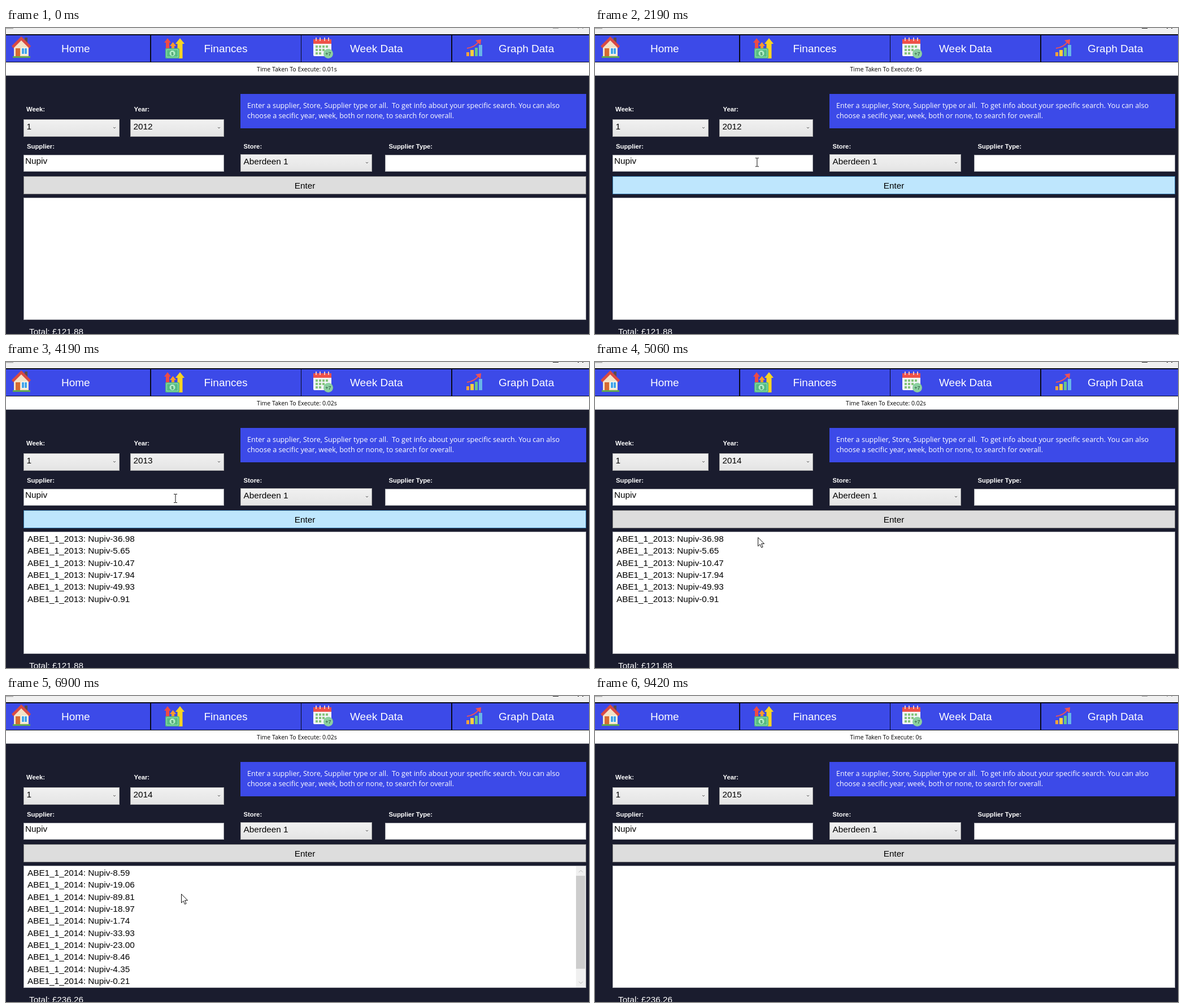
An HTML page for the animation above (9.49 s loop, 1032 by 543 pixels).

```html
<!DOCTYPE html>
<html lang="en">
<head>
<meta charset="utf-8">
<title>Finance search</title>
<style>
html, body { margin: 0; height: 100%; overflow: hidden; background: #1a1c2e; }
svg { display: block; width: 1032px; height: 543px; }
text { font: 15.3px "Liberation Sans", Arial, sans-serif; white-space: pre; }
.nav { font-size: 19px; fill: #fff; }
.label { font-size: 11.3px; font-weight: bold; fill: #fff; }
.hint { font: 12.58px "Open Sans", sans-serif; fill: #fff; }
.time { font: 10.53px "Open Sans", sans-serif; text-anchor: middle; }
.mid { text-anchor: middle; }
.white { fill: #fff; }
</style>
</head>
<body>
<svg viewBox="0 0 1032 543">
  <defs>
    <linearGradient id="grey" x2="0" y2="1"><stop stop-color="#f1f1f1"/><stop offset="1" stop-color="#e4e4e4"/></linearGradient>
    <linearGradient id="lit" x2="0" y2="1"><stop stop-color="#ecf4fc"/><stop offset="1" stop-color="#dcecfc"/></linearGradient>
  </defs>
  <g id="base"></g>
  <g id="house">
    <path fill="#5d4b4b" d="M33 17h5v12h-5z"/>
    <path fill="#f4e3c8" d="M14 33L27 21L40 33V51H14z"/>
    <path fill="#d94a43" d="M27 15L44 32L41 36L27 22L13 36L10 32z"/>
    <path fill="#d66b32" d="M17 36h8v15h-8z"/>
    <path fill="#fff" d="M27 35h11v12h-11z"/>
    <path fill="#42a5e8" d="M28 36h4v10h-4zM33 36h4v10h-4z"/>
    <path fill="#63a84f" d="M12 50h31v3H12z"/>
  </g>
  <g id="money">
    <path fill="#f9d423" d="M308 18L316 28H312.500V54H303.500V28H300z"/>
    <path fill="#f79a2e" d="M295.500 25L301 32H298V40H293V32H290z"/>
    <path fill="#ee4b45" d="M286 18L292 26H289V39H283V26H280z"/>
    <rect x="282" y="36" width="25" height="18" rx="2" fill="#56bd83"/>
    <rect x="284.500" y="38.500" width="20" height="13" fill="none" stroke="#97dfb4"/>
    <circle cx="294.500" cy="45" r="5" fill="#b3edc6"/>
    <text x="294.500" y="48" class="mid" style="font-size:8px;font-weight:bold" fill="#24834f">$</text>
  </g>
  <g id="calendar">
    <rect x="544" y="20" width="32" height="30" rx="2" fill="#f2f4f7"/>
    <path fill="#ee5149" d="M544 20h32v8h-32z"/>
    <path stroke="#f5c7c2" stroke-width="2" d="M549 17v6M556 17v6M564 17v6M571 17v6"/>
    <path stroke="#86c47b" stroke-width="4" stroke-dasharray="4 2" d="M548 33h24M548 39h18M548 45h12"/>
    <circle cx="570.500" cy="45.500" r="8.500" fill="#8bd0a0"/>
    <text x="570.500" y="49" class="mid" style="font-size:9px" fill="#25483a">+7</text>
  </g>
  <g id="chart">
    <path fill="#f9a13a" d="M815 43h5v7h-5z"/><path fill="#f7cf3f" d="M822 39h6v11h-6z"/>
    <path fill="#65c58c" d="M830 35h5v15h-5z"/><path fill="#68b5e8" d="M837 30h6v20h-6z"/>
    <path fill="none" stroke="#f05252" stroke-width="2" d="M816 36Q830 34 837 24"/>
    <path fill="#f05252" d="M831 22L841 20L840 30z"/>
  </g>
  <g id="live"></g>
</svg>
<script>
const LOOP = 9490, LAG = 60, ROW = 21.33, BRAND = "Nupiv";
const $ = id => document.getElementById(id);

const rect = (x, y, w, h, fill, line = "none") =>
  `<rect x="${x}" y="${y}" width="${w}" height="${h}" fill="${fill}" stroke="${line}"/>`;
const text = (s, x, y, cls = "") => `<text x="${x}" y="${y}" class="${cls}">${s}</text>`;
const chevron = (x, y, color, w = 2, d = 1) =>
  `<path d="M${x - w} ${y - d * w / 2}l${w} ${d * w}l${w} ${-d * w}" fill="none" stroke="${color}"/>`;
const combo = (s, x, y, w, fill = "url(#grey)", line = "#acacac") =>
  rect(x + .5, y + .5, w - 1, 30, fill, line) + text(s, x + 5.5, y + 17.5) + chevron(x + w - 9, y + 15, "#555");

// Latest value whose start time has passed
const at = (steps, t) => steps.filter(s => s[0] <= t).pop()[1];

const years = [[0, 2012], [3420, 2013], [5060, 2014], [7620, 2015]];
const times = [[0, "0.01s"], [1850, "0s"], [3620, "0.02s"], [8350, "0s"]];
const totals = [[0, "121.88"], [5500, "236.26"]];
const results = [[0, 0], [3620, 2013], [5500, 2014], [8350, 0]];
const amounts = {
  0: [],
  2013: ["36.98", "5.65", "10.47", "17.94", "49.93", "0.91"],
  2014: ["8.59", "19.06", "89.81", "18.97", "1.74", "33.93", "23.00", "8.46", "4.35", "0.21", "28.14"]
};
const opened = [[980, 1600], [2440, 3420], [4480, 5060], [7180, 7620]];
const path = [
  [70, 930, 0], [450, 560, 285], [600, 480, 280], [900, 300, 185], [1080, 300, 190],
  [1400, 269, 259], [1500, 272, 266], [1850, 272, 266], [2100, 280, 268], [2330, 300, 182],
  [2580, 300, 185], [2850, 276, 271], [3150, 285, 288], [3590, 285, 288], [3920, 310, 282],
  [4060, 310, 282], [4130, 308, 275], [4190, 300, 242], [4400, 300, 182], [4500, 300, 184],
  [4900, 285, 312], [5180, 290, 310], [5500, 320, 284], [5620, 323, 280], [5860, 323, 280],
  [6200, 310, 370], [6840, 310, 370], [7150, 310, 182], [7560, 292, 335], [7830, 292, 335],
  [8040, 297, 295], [8250, 310, 280], [8450, 310, 280], [8630, 350, 363], [8890, 350, 363],
  [9160, 975, 545]
];

function pointer(t) {
  const i = path.findIndex(p => p[0] > t);
  if (i < 1) return [-99, -99];
  const [t0, x0, y0] = path[i - 1], [t1, x1, y1] = path[i];
  const u = (t - t0) / (t1 - t0), e = u * u * (3 - 2 * u);
  return [x0 + (x1 - x0) * e, y0 + (y1 - y0) * e];
}

function cursor(x, y) {
  const beam = y > 225 && y < 255 && (x > 31 && x < 386 || x > 671 && x < 1027);
  const shape = beam
    ? `<path d="M-3 -7.500h2.500l.5 .5l.5 -.5h2.500M0 -7V7M-3 7.500h2.500l.5 -.5l.5 .5h2.500" fill="none" stroke="#111"/>`
    : `<path d="M.5 .5V16L4 12.700L6.500 18.500L9 17.400L6.500 11.700H11.500z" fill="#fff" stroke="#111"/>`;
  return `<g transform="translate(${x.toFixed(1)} ${y.toFixed(1)})">${shape}</g>`;
}

function listing(t) {
  const year = at(results, t), rows = amounts[year];
  const top = t >= 6420 && t < 6700 ? 1 : 0;
  let s = rows.slice(top, top + 10).map((a, i) =>
    text(`ABE1_1_${year}: ${BRAND}-${a}`, 38, 319 + i * ROW)).join("");
  if (rows.length > 10)
    s += rect(1009, 302, 17, 215, "#f0f0f0") + rect(1009, 319 + top * 17, 16, 165, "#cdcdcd") +
      chevron(1017.500, 311, "#b5b5b5", 3.500, -1) + chevron(1017.500, 508.500, "#b5b5b5", 3.500);
  return s;
}

function dropdown(t, start, year, y) {
  const h = 300 * Math.min(1, (t - start + 40) / 150);
  const over = Math.floor((y - 215.700) / ROW);
  let s = rect(223, 197, 165.500, 299, "#000", "none").replace("/>", ' opacity=".4"/>') +
    rect(220.500, 194, 165, 299.500, "#fff", "#777");
  for (let i = 0; i < 13; i++) {
    const top = Math.round(215.700 + i * ROW) + .5, picked = 2010 + i === year;
    if (i === over) s += rect(221.500, top, 163, 20.500, picked ? "#d1e8fd" : "#b5dff0", picked ? "#6fa8dc" : "#4a9fc4");
    else if (picked) s += rect(221.500, top, 163, 20.500, "#f5f5f5", "#dedede");
    s += text(2010 + i, 225.500, 231.700 + i * ROW);
  }
  return `<svg x="0" y="193" width="400" height="${h + 4}" viewBox="0 ${193 + 300 - h} 400 ${h + 4}">${s}</svg>`;
}

function draw(t) {
  const [x, y] = pointer(t), [hx, hy] = pointer(t - LAG);
  const year = at(years, t), drop = opened.find(([a, b]) => t >= a && t < b);
  const hot = !drop && hx > 31 && hx < 1027 && hy > 263 && hy < 294.500;
  const overYear = !drop && hx > 220 && hx < 386 && hy > 162 && hy < 193;
  const ink = t >= 1070 && t < 9420 ? "#222" : "#999";
  $("live").innerHTML =
    rect(968, 0, 10, 1, ink) + rect(1012, 0, 2, 1, ink) + rect(1020, 0, 2, 1, ink) +
    text("Time Taken To Execute: " + at(times, t), 515, 77, "time") +
    combo(year, 220, 162, 166, ...(overYear ? ["url(#lit)", "#7eb4ea"] : [])) +
    rect(31.500, 263.500, 995, 31, hot ? "#bee6fd" : "#ddd", hot ? "#3c7fb1" : "#8a8a8a") +
    text("Enter", 529, 285, "mid") +
    listing(t) +
    text("Total: £" + at(totals, t), 41, 544, "white") +
    (drop ? dropdown(t, drop[0], year, hy) : "") +
    cursor(x, y);
}

$("base").innerHTML =
  rect(0, 0, 1032, 11, "#f0f0f0") + rect(0, 0, 13, 1.500, "#aaa") +
  rect(0, 11, 1032, 51, "#080a18") +
  [[0, 255], [257, 265], [523, 265], [790, 242]].map(([x, w]) => rect(x, 13, w, 47, "#3c4ae8")).join("") +
  [["Home", 98], ["Finances", 350.500], ["Week Data", 609], ["Graph Data", 872]].map(([s, x]) => text(s, x, 42.500, "nav")).join("") +
  rect(0, 61, 1032, 23.500, "#fff") +
  rect(415, 117, 612, 61, "#3c4ae8") +
  text("Enter a supplier, Store, Supplier type or all.  To get info about your specific search. You can also", 427, 142, "hint") +
  text("choose a secific year, week, both or none, to search for overall.", 427, 160, "hint") +
  [["Week:", 36, 147.500], ["Year:", 226.500, 147.500], ["Supplier:", 37, 214], ["Store:", 420.500, 214], ["Supplier Type:", 677.500, 214]]
    .map(([s, x, y]) => text(s, x, y, "label")).join("") +
  combo(1, 31, 162, 170) + combo("Aberdeen 1", 415, 224, 233) +
  rect(31.500, 225.500, 354, 29, "#fff", "#abadb3") + text(BRAND, 34, 240.500) +
  rect(671.500, 225.500, 355, 29, "#fff", "#abadb3") +
  rect(31.500, 301.500, 995, 216, "#fff", "#abadb3");

function frame(now) {
  draw(now % LOOP);
  requestAnimationFrame(frame);
}
draw(0);
requestAnimationFrame(frame);
</script>
</body>
</html>
```
